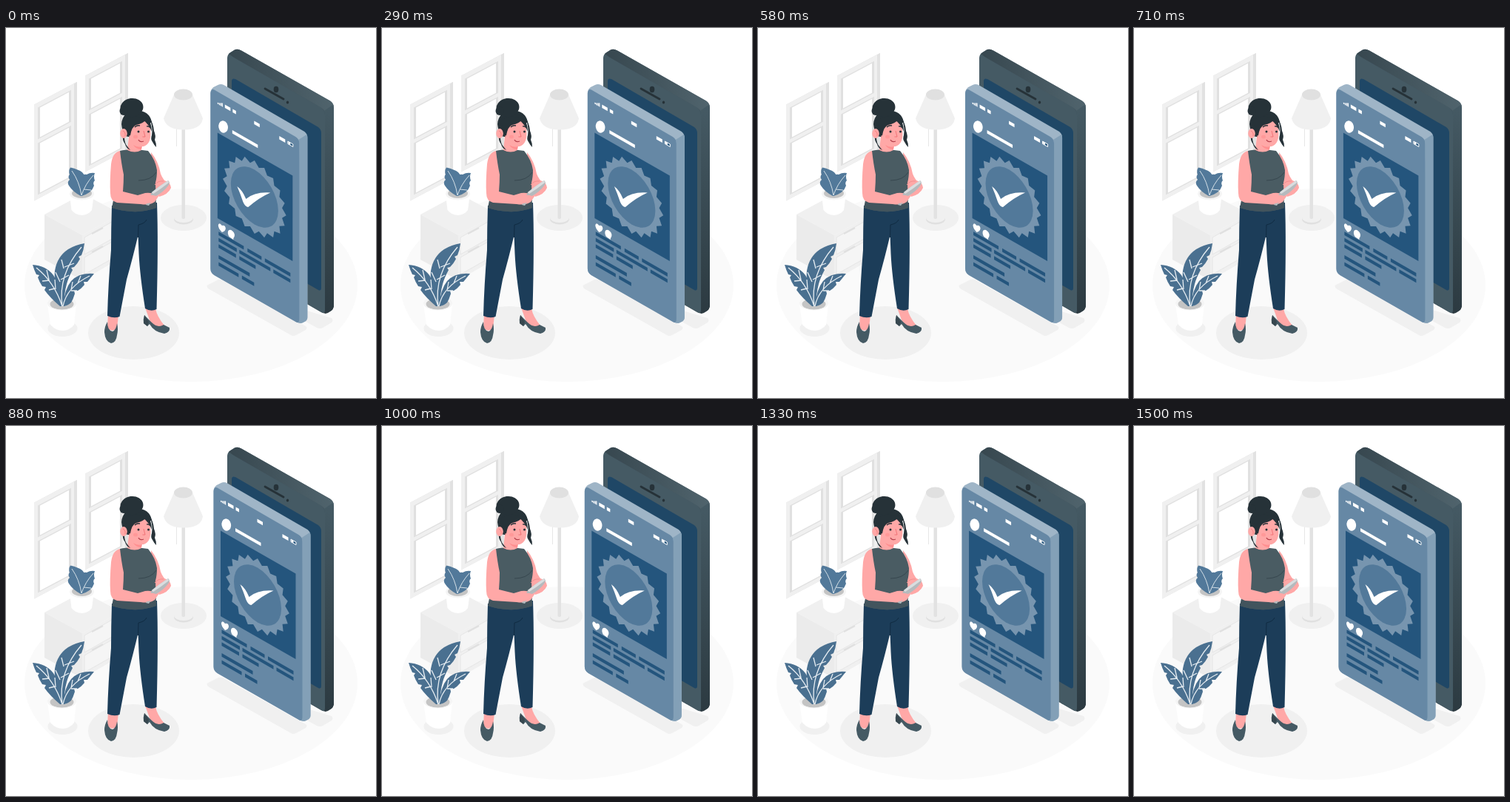
Animation, 500 px wide and 500 px high, one loop 1.54 s. Source, as an HTML page:

```html
<!DOCTYPE html>
<html lang="en">
<head>
<meta charset="utf-8">
<title>Verified post</title>
<style>
html, body { margin: 0; width: 100%; height: 100%; overflow: hidden; background: #fff; }
svg { display: block; width: 100vw; height: 100vh; }
</style>
</head>
<body>
<svg viewBox="0 0 500 500">
  <defs>
    <linearGradient id="side" x1="0" y1="0" x2="0" y2="1">
      <stop offset="0" stop-color="#455a64"/><stop offset="1" stop-color="#2c3a41"/>
    </linearGradient>
    <linearGradient id="bevel">
      <stop offset="0" stop-color="#37474f"/><stop offset="1" stop-color="#50646d"/>
    </linearGradient>
  </defs>

  <!-- floor and shadows -->
  <ellipse cx="250" cy="347.500" rx="225" ry="130.500" fill="#fafafa"/>
  <g fill="#f0f0f0">
    <ellipse cx="172.500" cy="412" rx="61.500" ry="36"/>
    <ellipse cx="240" cy="256.500" rx="31" ry="17.500"/>
    <ellipse cx="76.500" cy="406" rx="20" ry="11"/>
    <path d="M273 347L287 340Q290 339 293 340L405 403Q408 405 405 408L392 415Q388 417 385 415L273 352Q270 349 273 347Z"/>
    <path d="M400 380L440 392Q443 395 440 398L428 405Q424 407 420 405L400 394Z"/>
  </g>

  <!-- windows -->
  <g id="windows"></g>

  <!-- cabinet -->
  <path d="M52 252L104 224L155 251L103 280Z" fill="#f0f0f0"/>
  <path d="M52 252L103 280V341L52 313Z" fill="#ebebeb"/>
  <path d="M103 280L155 251V311L103 341Z" fill="#f0f0f0"/>
  <g fill="#f5f5f5" stroke="#e6e6e6">
    <path d="M106 283L152 257V280L106 306Z"/><path d="M106 310L152 284V307L106 333Z"/>
  </g>
  <path d="M116 278L131 270M116 303L131 295" stroke="#e0e0e0" stroke-width="2.500"/>

  <!-- lamp -->
  <ellipse cx="240" cy="258" rx="13" ry="7.500" fill="#e0e0e0"/>
  <ellipse cx="240" cy="256" rx="13" ry="7" fill="#f0f0f0"/>
  <path d="M237.500 134H242V257Q240 259 237.500 257Z" fill="#e2e2e2"/>
  <path d="M230.500 135V160" stroke="#e6e6e6"/>
  <path d="M227 90L213 122Q215 132 227 136Q240 139 253 136Q265 132 266 122L252 90Z" fill="#f0f0f0"/>
  <ellipse cx="239.500" cy="90" rx="12.500" ry="7.500" fill="#e0e0e0"/>

  <!-- small plant -->
  <path d="M86 224L88.500 246Q94 253 103 253Q112 252 116 246L119 224Z" fill="#fff"/>
  <ellipse cx="102.500" cy="224" rx="16.500" ry="8.500" fill="#f5f5f5"/>
  <ellipse cx="102.500" cy="223.500" rx="13.500" ry="6.500" fill="#c4c4c4"/>
  <path d="M101 227Q90 221 85 213Q82 208 86 205Q83 201 86 198Q84 193 87 188.500Q98 191 103 195Q108 200 107 208Q106 218 103 227Z" fill="#52799a"/>
  <path d="M102 227Q101 214 105 207L104 199Q106 197 109 198Q114 195 120 196Q118 201 120 206Q117 209 119 213Q116 223 102 227Z" fill="#52799a"/>
  <path d="M102 226Q99 207 89 193M102 226Q107 211 118 199M105 218L115 219" stroke="#e3eaef" stroke-width=".9" fill="none"/>

  <!-- big plant -->
  <path d="M56 373L60 401Q67 409 77 409Q87 408 92 401L95 373Z" fill="#fff"/>
  <ellipse cx="75.500" cy="372" rx="19.500" ry="9.500" fill="#f5f5f5"/>
  <ellipse cx="75.500" cy="373" rx="16" ry="7.500" fill="#c4c4c4"/>
  <g fill="#4a7090">
    <path d="M74 376Q64 347 66 328Q69 309 84 299Q94 293 106 291Q105 300 102 307L98 309L100 312Q97 318 92 323L88 324L90 327Q84 338 82 346Q78 360 79 376Z"/>
    <path d="M73 376Q59 364 52 354L54 350L49 349Q45 343 43 337L45 334L41 333Q38 327 36 320Q54 321 64 334Q73 348 77 376Z"/>
    <path d="M77 376Q79 353 88 342Q99 330 119 332Q114 338 110 343L105 343L106 347Q102 352 97 355L92 355L93 359Q91 366 88 371Q84 375 78 376Z"/>
  </g>
  <g fill="none" stroke="#e6edf2" stroke-width="1.300">
    <path d="M76 376Q70 333 102 296M73 343L67 330M78 325L75 313M74 340L85 334M79 323L92 318"/>
    <path d="M76 376Q65 343 41 324M58 340L55 327M67 353L66 340M59 341L49 342M66 352L58 354"/>
    <path d="M77 376Q82 350 113 335M88 354L90 343M97 345L101 335M88 355L96 355"/>
  </g>

  <!-- woman: legs -->
  <path d="M138 386L152 388L150 406Q143 412 137 405Z" fill="#ffa8a7"/>
  <path d="M137 397Q133 404 133 411Q134 424 142 426Q149 425 150 415Q152 407 150 399Q149 408 144 410Q137 409 137 397Z" fill="#455a64"/>
  <path d="M188 378L202 379Q204 390 214 402Q205 407 196 400Z" fill="#ffa8a7"/>
  <path d="M187 388Q185 394 186 399L191 403L194 400Q200 411 214 413Q222 411 221 405L213 401Q205 406 197 398Z" fill="#455a64"/>
  <path d="M187 388L186 399L191 403L193 397Z" fill="#37474f"/>
  <path d="M143 240L204 236Q206 290 203.500 380Q196 384 188 379Q181 335 179.500 305L178.500 280Q172 308 163 340L153.500 390Q146 393 137 389Q138 348 142 300Q142 270 143 240Z" fill="#1c3d59"/>
  <path d="M178.500 283L179 266Q188 264 190 259" stroke="#102b42" fill="none"/>

  <!-- woman: body -->
  <path d="M196 168Q206 180 209 197Q213 207 217 207Q222 209 223 216Q219 225 207 228L197 212Z" fill="#ffa8a7"/>
  <path d="M154 166Q165 163 184 165L192 166Q202 178 204 192Q204 202 202 209L203 243Q187 249 170 248Q154 247 144 243Q150 225 152 210Q150 190 154 166Z" fill="#4a5c63"/>
  <path d="M145 233Q170 241 202 235L203 243Q187 249 170 248Q154 247 143 243Z" fill="#42545d"/>
  <path d="M179 206Q196 206 203 195" stroke="#37474f" fill="none"/>
  <path d="M154 166Q144 168 142 184Q140 208 141 223Q141 234 150 236L182 238Q194 240 201 235L207 226Q198 222 188 223L178 226L158 221Q159 208 159 198Q156 184 154 166Z" fill="#ffa8a7"/>
  <path d="M189 239L197 222Q208 213 219 206Q222 208 220 212Q213 222 201 228L193 240Z" fill="#b5babd"/>
  <path d="M197 222Q208 213 219 206L220 209Q210 217 199 224Z" fill="#dadddf"/>
  <path d="M183 228Q193 224 203 227L200 233Q195 238 186 237Z" fill="#ffa8a7"/>
  <path d="M201 212Q205 206 213 207" stroke="#f28f8f" fill="none"/>

  <!-- woman: head -->
  <path d="M166 146L164 165Q174 170 183 165L183 155Z" fill="#ffa8a7"/>
  <path d="M172 158Q178 162 184 160L183 164Q176 164 172 158Z" fill="#ff8f90"/>
  <path d="M156 130Q157 113 176 111Q194 112 197 127L170 148L161 146Q157 139 156 130Z" fill="#263238"/>
  <path d="M194 122Q199 134 197 145Q195 150 198 154Q200 158 203 161Q203 155 201 151Q203 146 200 139Q199 128 194 122Z" fill="#263238"/>
  <path d="M160 146Q160 156 164 160L168 165Q162 162 161 157Q157 152 158 146Z" fill="#263238"/>
  <path d="M167 134Q173 126 188 124Q195 128 195.500 142Q195.500 157 186 160Q175 161 168 153Q165 146 167 134Z" fill="#ffa8a7"/>
  <ellipse cx="159" cy="142.500" rx="4.800" ry="6.500" fill="#ffa8a7"/>
  <path d="M158 139Q162 141 161 146" stroke="#f28080" fill="none"/>
  <path d="M160 126Q171 115 190 123Q186 129 176 131Q170 133 168 145Q163 148 164 135Z" fill="#263238"/>
  <path d="M188 121Q197 125 197 140Q193 130 185 124Z" fill="#263238"/>
  <ellipse cx="170" cy="107.500" rx="15.500" ry="12.500" transform="rotate(-8 170 107.500)" fill="#263238"/>
  <ellipse cx="159" cy="112" rx="5.500" ry="6" fill="#263238"/>
  <g fill="#263238"><circle cx="179" cy="140" r="1.500"/><circle cx="192.500" cy="140" r="1.500"/></g>
  <path d="M174 134Q177 131 181 132M190 133Q193 132 195 135" stroke="#263238" stroke-width="1.300" fill="none"/>
  <path d="M186 139L188 147L184.500 147" stroke="#f06e72" fill="none" stroke-width=".9"/>
  <path d="M179 151Q181 155 186 153" stroke="#b5404c" fill="none" stroke-width="1.200"/>
  <ellipse cx="175" cy="147" rx="3" ry="2.500" fill="#ff8f90" opacity=".6"/>

  <!-- rear phone -->
  <path d="M299 41Q299 35 304 32.500L309 29.500Q313 27.500 318 30.500L438 98.500Q443 101.500 443 108V375Q443 380 438 383L435 385Q431 387 426 384L305 314Q299 310 299 304Z" fill="url(#side)"/>
  <path d="M301 35L309 29.500Q313 27.500 318 30.500L438 98.500Q442 101 443 106L431 113Q430 110 426 108L308 40Q304 37 301 35Z" fill="url(#bevel)"/>
  <path d="M299 41Q300 36 306 39L425 107Q431 111 431 117V381Q431 387 426 384L305 314Q299 310 299 304Z" fill="#455a64"/>
  <path d="M431 117Q431 114 430 112L441 104Q443 107 443 109V375Q443 380 438 383L431 386Z" fill="url(#side)"/>
  <path d="M305 72Q305 67 310 69L422 134Q426 137 426 142V351Q426 356 422 354L309 289Q305 286 305 282Z" fill="#1f4766"/>
  <g fill="#263238">
    <ellipse cx="365" cy="83" rx="3.300" ry="4.200"/><ellipse cx="380.500" cy="100.500" rx="1.700" ry="2"/>
  </g>
  <path d="M350 82L375 96" stroke="#263238" stroke-width="2.800" stroke-linecap="round"/>

  <!-- front panel -->
  <g id="panel">
    <path d="M276 88Q276 83 280 80L286 77Q290 75 294 77L403 140Q407 143 407 148V391Q407 395 403 397L400 398.500Q396 400 392 397L281 334Q276 331 276 325Z" fill="#9fb5c7"/>
    <path d="M396 156Q396 153 395 151L406 144Q407 146 407 148V391Q407 395 403 397L400 398.500Q397 399 394 398Z" fill="#83a0b7"/>
    <path d="M276 88Q277 81 282 84L391 147Q396 150 396 156V393Q396 400 391 397L281 334Q276 331 276 325Z" fill="#6688a5"/>
    <path d="M285.500 141.500L387 199.500V315L285.500 257Z" fill="#24557d"/>
    <g id="bars"></g>
    <path d="M380.500 153L387.500 157V160.500L380.500 156.500Z" fill="#24557d" stroke="#fff"/>
    <path d="M381 153.500L384 155V158L381 156.500Z" fill="#fff"/>
    <ellipse cx="293.300" cy="133.500" rx="6.300" ry="8.300" transform="rotate(-12 293.300 133.500)" fill="#fff"/>
    <g transform="matrix(.866 .5 0 1 335.500 228.500)">
      <path id="burst" fill="#7795af"/>
      <circle r="37" fill="#52799a"/>
    </g>
    <path d="M312 214Q319 219 324 231Q336 221 357 222.500Q342 229 327 242Q323 242 320 235Q316 223 312 214Z" fill="#fff"/>
    <path d="M291.500 276Q286 270 286.500 266Q288 262 291.500 267Q296 266 296.500 271Q296 275 291.500 276Z" fill="#fff"/>
    <path d="M299.500 276Q300 272 304 273Q309 276 308.500 281Q308 283 307 284L307 286L304 284Q299 281 299.500 276Z" fill="#fff"/>
  </g>
</svg>
<script>
const $ = id => document.getElementById(id);
const SLOPE = .574;

// slanted quad from x1 to x2, h tall, climbing or falling by k
const quad = (x1, y, x2, h, k, fill) => {
  const y2 = y + (x2 - x1) * k;
  return `<path d="M${x1} ${y}L${x2} ${y2}V${y2 + h}L${x1} ${y + h}Z" fill="${fill}"/>`;
};

const pane = (x, y, h) =>
  quad(x, y, x + 45, h, -.53, '#e0e0e0') + quad(x + 3, y, x + 42, h - 3, -.53, '#fff');
const frame = (x, y) =>
  quad(x, y, x + 58, 130, -.53, '#e2e2e2') +
  quad(x, y, x + 54, 130, -.53, '#f0f0f0') +
  pane(x + 5, y + 4, 43) + pane(x + 5, y + 52, 70);
$('windows').innerHTML = frame(38, 103.5) + frame(107, 64.5);

const white = [
  [285.5, 100.5, 287, 2], [287.6, 101, 289, 3], [289.6, 101, 291, 4], [291.4, 101, 292.6, 5],
  [295.5, 103.5, 303, 4.5], [306, 109.5, 310.5, 4.5], [335, 125.5, 342.5, 4.5],
  [369, 146, 377, 4.5], [305.5, 138, 340, 4.5]
];
const lines = [
  [287, 278.5, 321], [326, 301, 345], [349.5, 314.5, 384],
  [287, 287, 311.5], [315, 303, 357], [361, 329.5, 384],
  [287, 295.5, 310.5], [315, 311.5, 337],
  [287, 307, 329], [287, 316.5, 314], [318.5, 334.5, 335]
].map(([x, y, x2], i) => [x, i < 8 ? y - 3.2 : y, x2]);
$('bars').innerHTML =
  white.map(([x, y, x2, h]) => quad(x, y, x2, h, SLOPE, '#fff')).join('') +
  lines.map(([x, y, x2]) => quad(x, y, x2, 4.8, SLOPE, '#24557d')).join('');

const TEETH = 20;
$('burst').setAttribute('d', 'M' + Array.from({ length: TEETH * 2 }, (_, i) => {
  const r = i % 2 ? 43.5 : 49.5, a = i * Math.PI / TEETH;
  return `${(r * Math.cos(a)).toFixed(2)} ${(r * Math.sin(a)).toFixed(2)}`;
}).join('L') + 'Z');

// sideways shake, one value per tenth of the cycle
const SHAKE = [0, -1, 2, -4, 4, -4, 4, -4, 2, -1, 0];
const LOOP = 1540, CYCLE = 1500, STEP = CYCLE / 36, LEAD = 25;

function shake(ms) {
  const p = Math.min(ms / CYCLE, 1) * 10, i = Math.min(Math.floor(p), 9);
  return SHAKE[i] + (SHAKE[i + 1] - SHAKE[i]) * (p - i);
}

const start = performance.now();
function draw(now) {
  const t = Math.max(0, now - start) % LOOP;
  const held = Math.floor((t + 5) / STEP) * STEP;
  $('panel').setAttribute('transform', `translate(${(shake(held + LEAD) + .5).toFixed(3)} 0)`);
  requestAnimationFrame(draw);
}
draw(start);
</script>
</body>
</html>
```
